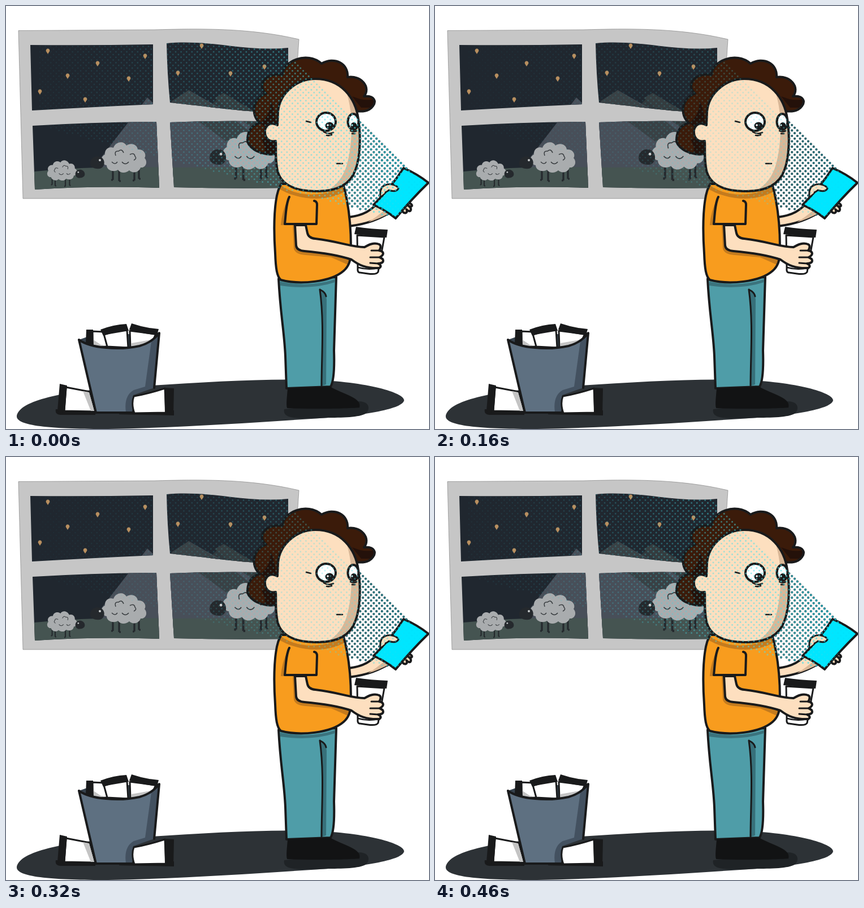
Animation, 748 px wide and 749 px high, one loop 500 ms. Source, as an HTML page:

```html
<!DOCTYPE html>
<html lang="en">
<head>
<meta charset="utf-8">
<title>Late night scrolling</title>
<style>
html, body { margin: 0; width: 100%; height: 100%; overflow: hidden; background: #fff; }
svg { display: block; width: 748px; height: 749px; }
.ink { stroke: #191a1b; stroke-width: 4; stroke-linejoin: round; stroke-linecap: round; }
.line { fill: none; }
.thin { stroke-width: 2.6; }
.skin { fill: #fddfbf; }
.cap { fill: #191a1b; }
.cup { fill: #fff; stroke-width: 3; }
#glow { animation: glow 500ms step-end infinite; }
#shade { animation: shade 500ms step-end infinite; }
@keyframes glow {
  0% { opacity: 1 } 4% { opacity: .55 } 8% { opacity: .15 } 12% { opacity: .4 }
  16% { opacity: .7 } 20% { opacity: .93 } 24% { opacity: .6 } 28% { opacity: .3 }
  32% { opacity: .5 } 36% { opacity: .8 } 40% { opacity: 1 } 52% { opacity: .55 }
  56% { opacity: .13 } 60% { opacity: .35 } 64% { opacity: .6 } 68% { opacity: .8 }
  72% { opacity: .55 } 76% { opacity: .2 } 80% { opacity: 0 } 84% { opacity: .3 }
  88% { opacity: .7 } 92%, 100% { opacity: 1 }
}
@keyframes shade {
  0% { opacity: 1 } 80% { opacity: 0 } 84%, 100% { opacity: 1 }
}
</style>
</head>
<body>
<svg viewBox="0 0 748 749">
<defs>
  <path id="paneA" d="M43 69Q150 70 260 68L260 174Q150 179 46 185Z"/>
  <path id="paneB" d="M284 66C340 61 390 71 430 74Q470 77 499 74L499 190C430 189 350 177 290 171Q285 120 284 66Z"/>
  <path id="paneC" d="M47 212Q150 206 266 205L271 322Q160 318 51 325Z"/>
  <path id="paneD" d="M290 206Q380 202 500 205L500 322Q400 324 297 321Z"/>
  <path id="hair" d="M480 261C456 268 425 252 427 235C428 219 437 210 449 207C432 193 436 164 460 155C444 143 456 117 489 122C489 98 532 79 558 102C580 89 606 101 604 126C628 122 646 144 633 160C652 158 655 169 649 177C641 188 628 187 618 186Z"/>
  <path id="head" d="M481 187C484 154 514 129 547 129C593 129 618 163 623 200C628 232 626 269 618 290C609 317 585 328 550 328C506 328 482 313 479 285C476 265 478 250 477 239C463 242 457 231 458 220C460 209 470 205 480 211Z"/>
  <path id="shirt" d="M487 315C473 334 473 395 476 438C477 465 479 479 486 485C520 494 574 489 597 469C608 460 611 445 610 428C610 394 606 350 596 314Z"/>
  <path id="cone" d="M612 190L718 289L690 376L672 372L596 356Z"/>
  <path id="phone" d="M703 287Q727 297 747 313Q717 342 689 376Q672 362 650 352Q681 321 703 287Z"/>
  <clipPath id="panes"><use href="#paneA"/><use href="#paneB"/><use href="#paneC"/><use href="#paneD"/></clipPath>
  <clipPath id="lit"><use href="#paneA"/><use href="#paneB"/><use href="#paneC"/><use href="#paneD"/><use href="#hair"/><use href="#head"/><use href="#shirt"/><use href="#cone"/><use href="#phone"/></clipPath>
  <clipPath id="inCone"><use href="#cone"/></clipPath>
  <clipPath id="inHead"><use href="#head"/></clipPath>
  <clipPath id="inHair"><use href="#hair"/></clipPath>
  <clipPath id="inShirt"><use href="#shirt"/></clipPath>
  <linearGradient id="fade" gradientUnits="userSpaceOnUse" x1="59" x2="720" y1="0" y2="0">
    <stop offset="0" stop-color="#39c6d6" stop-opacity=".05"/>
    <stop offset=".35" stop-color="#39c6d6" stop-opacity=".22"/>
    <stop offset=".62" stop-color="#46dbe5" stop-opacity=".42"/>
    <stop offset=".84" stop-color="#4ee2ea" stop-opacity=".6"/>
    <stop offset="1" stop-color="#00e0fa" stop-opacity=".7"/>
  </linearGradient>
  <g id="sheep">
    <path d="M-20 20V40M-9 20V42M18 20V41M26 20V38M-20 40h-3M-9 42h3M18 41h-3M26 38h3" fill="none" stroke="#25292d" stroke-width="3.2"/>
    <path d="M-31 14C-42 12-43-1-34-5C-35-15-26-20-19-17C-15-28-1-30 4-21C12-27 23-23 24-14C35-15 40-5 36 1C43 9 37 19 29 18C26 27 15 29 9 23C2 29-7 28-11 22C-19 27-31 23-31 14Z" fill="#a9acae"/>
    <path d="M-15-3q-3-9 5-8q6-5 9 3M10-5q8-4 9 3q4 4-2 7M-22 8q6 6 10 0M-4 8q6 7 12 0" fill="none" stroke="#393d40" stroke-width="1.5"/>
    <path d="M-60 8C-58-2-45-5-38 2C-33 8-35 18-43 20C-53 21-62 17-60 8Z" fill="#25292d"/>
    <circle cx="-43" cy="5" r="2" fill="#c9cccd"/>
  </g>
  <path id="star" d="M0 5L-3.2 0A3.4 3.4 0 1 1 3.2 0Z" fill="#b98f5f"/>
</defs>

<!-- window -->
<path d="M22 43.5L262 42C340 40 430 38 518 59L500 341L30 341Z" fill="#c6c6c6" stroke="#777" stroke-width=".6"/>
<g clip-path="url(#panes)">
  <rect x="30" y="50" width="490" height="290" fill="#20272f"/>
  <path d="M385 154L320 215L520 300V244Z" fill="#30383c"/>
  <path d="M250 162L140 305H400Z" fill="#484f59"/>
  <path d="M323 149L215 260V310H520V262Z" fill="#484f59"/>
  <path d="M323 149L292 169L420 262L480 262L385 186Z" fill="#394145"/>
  <path d="M385 154L369 163L480 252L520 252V235Z" fill="#343c3f"/>
  <path d="M40 294Q160 282 280 286L510 285V330H40Z" fill="#455451"/>
  <g id="stars"></g>
  <use href="#sheep" transform="translate(99 291) scale(-.67 .67)"/>
  <use href="#sheep" transform="translate(209 268)"/>
  <use href="#sheep" transform="translate(430 256) scale(1.16 1.24)"/>
</g>

<!-- floor -->
<path d="M19 727C21 701 90 683 200 676C320 668 440 659 540 662C640 665 704 685 704 698C702 713 640 725 540 731C430 738 300 747 180 749C90 749 20 745 19 727Z" fill="#2d3236"/>
<path d="M492 714C488 733 520 731 570 729C600 729 630 728 638 720C645 710 640 700 624 700Z" fill="#1f2326"/>

<!-- bin and cups -->
<path d="M88 714L158 715V724H96Q86 723 88 714ZM200 715L297 716V725L200 723Z" class="cap"/>
<path class="ink cup" d="M106 675L148 683L158 718L103 717Z"/>
<path d="M136 682L147 684L156 717H150Z" fill="#c4c4c4"/>
<path class="cap" d="M95 669L108 672L104 720L91 717Z"/>
<path d="M129 591L146 585L270 578L266 592L220 607L160 603Z" fill="#36424d"/>
<path class="ink cup" d="M153 576L174 577L180 603L153 601Z"/>
<path d="M153 590L168 600L180 602H153Z" fill="#c4c4c4"/>
<path class="cap" d="M142 573H154L155 602L141 598Z"/>
<path class="ink cup" d="M173 581L214 574L216 605L179 603Z"/>
<path class="ink cup" d="M219 575L265 581L256 600L220 605Z"/>
<path d="M222 597L262 590L258 598L222 604Z" fill="#c4c4c4"/>
<path class="cap" d="M167 573Q190 564 213 563L217 575Q195 576 172 584ZM222 562Q245 570 270 572L267 583Q240 580 218 573Z"/>
<path d="M129 591C150 606 200 610 236 602Q258 596 271 580L262 676L224 686L223 720L159 720Z" fill="#5e7081"/>
<path d="M257 594L270 582L262 676L225 689L223 719H212Q208 690 226 680L246 674Z" fill="#435160"/>
<path class="ink line" d="M159 720L129 591C150 606 200 610 236 602Q258 596 271 579L262 676M159 720H223"/>
<path class="ink cup" d="M226 691Q250 687 281 677L283 720L227 721Q221 704 226 691Z"/>
<path class="cap" d="M280 676L297 677L296 724L281 722Z"/>

<!-- light on the empty wall -->
<g id="shade" clip-path="url(#inCone)"><path id="dark" fill="#203c43"/></g>

<!-- far arm, phone -->
<path class="ink skin" d="M606 374C630 371 648 363 662 342L682 364C660 377 640 386 606 390Z"/>
<path d="M640 383Q660 377 680 366L672 359Q655 374 640 383Z" fill="#d9b797"/>
<path class="ink skin" d="M699 360C704 371 712 366 708 360C715 368 720 359 712 354C720 358 720 349 711 349Z"/>
<use href="#phone" class="ink" fill="#00e6ff"/>
<path class="ink skin" style="stroke-width:3" d="M662 337C661 326 664 319 671 317C680 313 692 318 694 323C691 329 683 328 677 326Q674 329 671 330"/>

<!-- legs -->
<path class="ink" d="M482 483C485 545 492 575 494 620L496 677L574 674C580 664 581 640 580 610L584 480Z" fill="#4f9da8"/>
<path d="M485 488Q535 499 582 484V489Q540 503 485 495Z" fill="#3b737d"/>
<path d="M555 502Q566 506 567 520L566 670L557 673Q562 590 555 502Z" fill="#37707a"/>
<path class="ink line" style="stroke-width:3" d="M555 502Q565 507 566 514M555 502C563 560 558 620 558 672"/>
<path d="M498 677C497 692 495 705 497 712C540 714 600 713 625 711C630 694 600 689 573 674Z" fill="#121314"/>

<!-- body -->
<use href="#shirt" fill="#f89c1e"/>
<g clip-path="url(#inShirt)" fill="#c47b1e">
  <path d="M480 312C510 340 560 340 600 318V328C565 348 515 344 480 322Z"/>
  <path d="M501 338Q488 360 486 388H495Q493 360 501 338Z"/>
  <path d="M507 388L509 430Q512 440 530 441L575 445L613 462V440L535 432L518 388Z"/>
</g>
<use href="#shirt" class="ink line"/>
<path class="ink" d="M501 338C495 350 495 368 493 386L549 386L550 352Q550 346 545 345" fill="#f89c1e"/>

<!-- coffee, near arm -->
<path class="ink cup" d="M621 406L669 409L658 471Q655 476 640 474L626 472Q621 472 622 464Z"/>
<path class="ink line" style="stroke-width:2.5" d="M623 463Q640 468 659 464"/>
<path class="cap" d="M619 391Q645 395 675 396L673 410Q645 407 616 404Z"/>
<path class="ink skin" d="M511 388L513 424Q514 433 528 434C562 437 590 442 611 449C624 459 637 465 660 464Q666 460 658 456Q670 455 666 448L661 445Q671 439 664 434L660 433Q665 425 660 422C650 418 641 423 634 427C610 427 590 417 547 412Q535 411 533 402L530 388Z"/>
<path class="ink line" style="stroke-width:3" d="M646 433L660 433M644 445L661 445M644 455L658 456"/>

<!-- head -->
<use href="#hair" fill="#3b1b0a"/>
<g clip-path="url(#inHair)">
  <path d="M440 268Q468 266 452 236Q470 235 478 205L490 265ZM449 207Q468 195 468 168Q476 180 480 230ZM612 160L628 180H655V164Q640 168 627 165Z" fill="#24110a"/>
</g>
<use href="#hair" class="ink line"/>
<use href="#head" class="skin"/>
<path clip-path="url(#inHead)" d="M597 140C616 180 613 245 603 280Q594 313 567 327L630 330V140Z" fill="#d8b797"/>
<use href="#head" class="ink line"/>
<ellipse class="ink" cx="566" cy="205" rx="17" ry="16" fill="#fff"/>
<ellipse cx="572" cy="212" rx="7.5" ry="6.5" class="cap"/>
<circle cx="569" cy="211" r="1.8" fill="#fff"/>
<g clip-path="url(#inHead)">
  <ellipse class="ink" cx="614" cy="205" rx="9.5" ry="14" fill="#fff"/>
  <ellipse cx="615" cy="212" rx="5.5" ry="6" class="cap"/>
  <circle cx="612" cy="211" r="1.5" fill="#fff"/>
</g>
<path class="ink line thin" d="M531 204L539 206M562 223Q570 228 579 224M567 229Q572 230 576 228M609 221Q614 224 620 221M612 226L617 226M585 279H595"/>

<!-- phone light -->
<g id="glow" clip-path="url(#lit)"><path id="dots" fill="url(#fade)"/></g>
</svg>
<script>
const byId = id => document.getElementById(id);

byId('stars').innerHTML = [[74, 80], [246, 89], [162, 102], [109, 124], [217, 129], [60, 152],
  [140, 166], [346, 71], [304, 119], [397, 120], [457, 108]]
  .map(([x, y]) => `<use href="#star" x="${x}" y="${y}"/>`).join('');

// The beam opens leftwards from the phone between two straight edges.
const inBeam = (x, y) => y > 288 + (x - 716) * 0.93 && y < 374 + (x - 680) * 0.26;

// Staggered halftone grid; radius depends on the distance to the phone.
function halftone(left, radius) {
  const step = 9.6;
  let d = '';
  for (let row = 0, y = 62; y < 374; row++, y += step / 2) {
    for (let x = 60 + (row % 2) * step / 2; x < 744; x += step) {
      if (x < left || !inBeam(x, y)) continue;
      const r = radius(x);
      d += `M${(x - r).toFixed(1)} ${y.toFixed(1)}a${r} ${r} 0 1 0 ${2 * r} 0a${r} ${r} 0 1 0 ${-2 * r} 0`;
    }
  }
  return d;
}

byId('dark').setAttribute('d', halftone(590, () => 2.1));
byId('dots').setAttribute('d', halftone(59, x => +(1.3 + (x - 59) / 1800).toFixed(2)));
</script>
</body>
</html>
```
